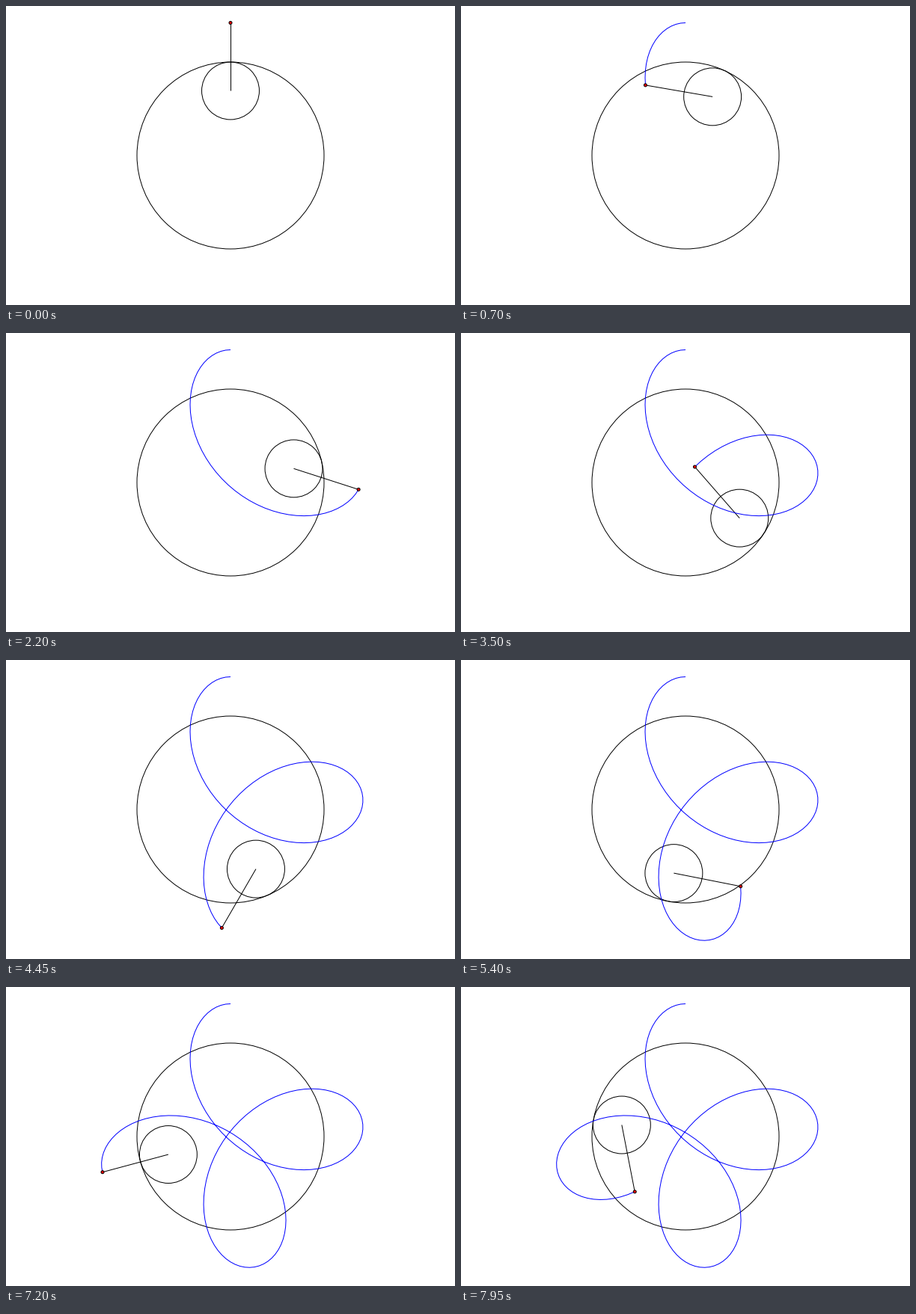
A matplotlib script for the animation above (8 s loop, 600 px wide and 400 px high).

```python
import numpy as np
import matplotlib.pyplot as plt
from matplotlib.animation import FuncAnimation
from matplotlib.patches import Circle

W, H, DPI = 600, 400, 100
FRAMES, INTERVAL = 160, 50
CX, CY = W / 2, H / 2
R = 125            # fixed circle
RATIO = 3.25
r = R / RATIO      # rolling circle
ARM = 91           # pen distance from the rolling centre
STEP = 0.1         # arm turn per frame, in radians
PX = 72 / DPI      # one pixel in points


def hub(n):
    """Centre of the rolling circle after n steps."""
    a = n * STEP / RATIO
    return CX + (R - r) * np.sin(a), CY - (R - r) * np.cos(a)


def pen(n):
    """Tip of the arm after n steps."""
    x, y = hub(n)
    return x - ARM * np.sin(n * STEP), y - ARM * np.cos(n * STEP)


fig = plt.figure(figsize=(W / DPI, H / DPI), dpi=DPI, facecolor="white")
ax = fig.add_axes([0, 0, 1, 1])
ax.set_xlim(0, W)
ax.set_ylim(H, 0)
ax.axis("off")

ring = ax.add_patch(Circle((CX, CY), R, fill=False, ec="black", lw=PX, zorder=1))
wheel = ax.add_patch(Circle(hub(0), r, fill=False, ec="black", lw=PX, zorder=2))
arm, = ax.plot([], [], color="black", lw=PX, zorder=3, solid_capstyle="butt")
trail, = ax.plot([], [], color="blue", lw=PX, zorder=4, solid_capstyle="butt")
dot = ax.add_patch(Circle(pen(0), 2, fc="red", ec="black", lw=PX, zorder=5))

trail_x, trail_y = pen(np.arange(FRAMES))


def draw(n):
    c, p = hub(n), pen(n)
    wheel.center = c
    dot.center = p
    arm.set_data([c[0], p[0]], [c[1], p[1]])
    trail.set_data(trail_x[:n + 1], trail_y[:n + 1])
    return wheel, arm, trail, dot


anim = FuncAnimation(fig, draw, frames=FRAMES, interval=INTERVAL,
                     init_func=lambda: draw(0), repeat=True, repeat_delay=0)
plt.show()
```
